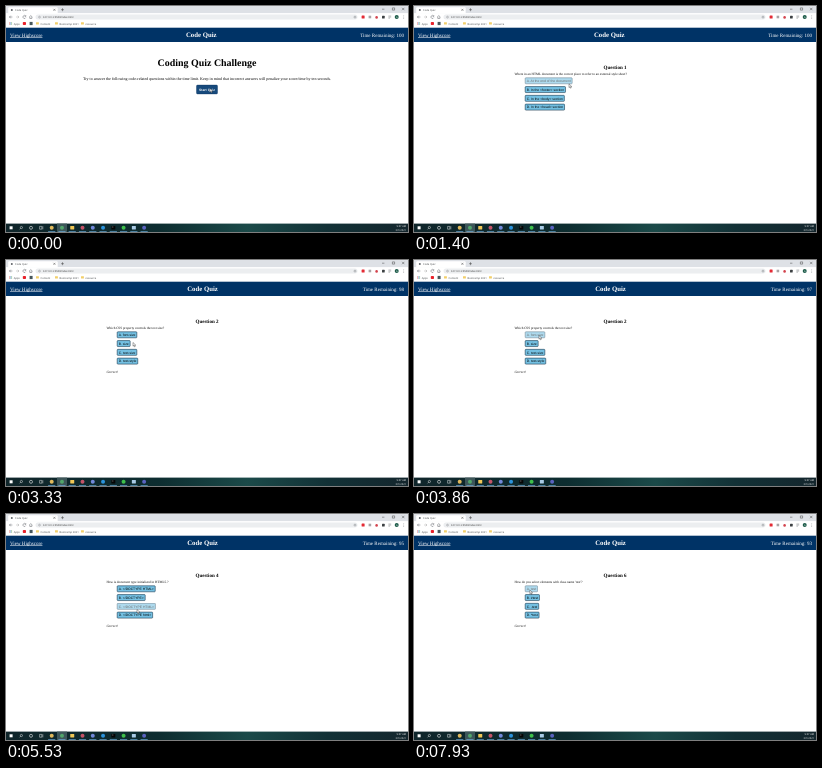
An HTML page that plays this animation: 402 px wide and 226 px high, repeating every 8000 ms.

```html
<!DOCTYPE html>
<html lang="en">
<head>
<meta charset="utf-8">
<title>Code Quiz</title>
<style>
  html, body { margin: 0; width: 100%; height: 100%; overflow: hidden; background: #fff; }
  svg { display: block; width: 402px; height: 226px; }
  text { text-rendering: geometricPrecision; white-space: pre; }
  .serif { font-family: "Liberation Serif", "Times New Roman", serif; }
  .sans { font-family: "Liberation Sans", Arial, sans-serif; }
  .ui { font-family: "Open Sans", "Noto Sans", sans-serif; }
  .bold { font-weight: bold; }
  .mid { text-anchor: middle; }
  .end { text-anchor: end; }
  .hover { opacity: .58; }
</style>
</head>
<body>
<svg id="stage" viewBox="0 0 402 226" xmlns="http://www.w3.org/2000/svg">
  <defs>
    <linearGradient id="bar">
      <stop offset="0" stop-color="#10262b"/>
      <stop offset=".38" stop-color="#0d2d30"/>
      <stop offset=".6" stop-color="#1b4a49"/>
      <stop offset=".8" stop-color="#123136"/>
      <stop offset="1" stop-color="#14262d"/>
    </linearGradient>
  </defs>
</svg>
<script>
const LOOP = 8000, FPS = 15, START = 530;
const stage = document.getElementById("stage");

function add(parent, tag, attrs) {
  const el = document.createElementNS("http://www.w3.org/2000/svg", tag);
  for (const key in attrs) el.setAttribute(key, attrs[key]);
  parent.appendChild(el);
  return el;
}
const rect = (p, x, y, width, height, fill, more) =>
  add(p, "rect", { x, y, width, height, fill, ...more });
const dot = (p, cx, cy, r, fill, more) => add(p, "circle", { cx, cy, r, fill, ...more });
const line = (p, d, stroke, w = .5) =>
  add(p, "path", { d, stroke, "stroke-width": w, fill: "none" });
function text(p, str, x, y, size, cls, fill = "#000", more) {
  const el = add(p, "text", { x, y, "font-size": size, class: cls, fill, ...more });
  el.textContent = str;
  return el;
}

// Browser window
const chrome = add(stage, "g", {});
const gray = "#5f6368";
rect(chrome, 0, 0, 402, 7.4, "#dee1e6");
rect(chrome, 2.2, 1.2, 49.5, 6.4, "#fff", { rx: 1.2 });
dot(chrome, 5.8, 4.1, 1, gray);
text(chrome, "Code Quiz", 9, 4.6, 2.6, "ui", "#3c4043");
line(chrome, "M47.4 2.8l2 2m0-2l-2 2M56.5 2.2v3M55 3.7h3", "#333", .45);
line(chrome, "M376 3.2h2.4M386.4 1.9h2.2v2.2h-2.2zM396 1.8l2.4 2.4m0-2.4l-2.4 2.4", "#222", .4);
rect(chrome, 0, 7.2, 402, 14.8, "#fff");
line(chrome, "M6.4 11H3.4m1.3-1.3L3.4 11l1.3 1.3", gray);
line(chrome, "M10 11h3m-1.3-1.3L13 11l-1.3 1.3", "#aaa");
line(chrome, "M19.6 10a1.5 1.5 0 1 0 .2 1.6M19.8 9.2v1.2h-1.2", gray);
line(chrome, "M23.2 11.1l1.6-1.5 1.6 1.5M23.8 10.8v1.7h2v-1.7", gray);
rect(chrome, 29.5, 8.6, 322, 5, "#eceef0", { rx: 2.5 });
dot(chrome, 33.5, 11.1, .9, "none", { stroke: gray, "stroke-width": .35 });
text(chrome, "127.0.0.1:5500/index.html", 37, 12, 2.65, "sans", "#444");
dot(chrome, 349, 11.1, 1, "none", { stroke: gray, "stroke-width": .4 });
rect(chrome, 355.6, 9.5, 3, 3, "#e32b35", { rx: .5 });
rect(chrome, 362.6, 9.7, 2.6, 2.6, "#a9a3a5");
dot(chrome, 370.6, 11.4, 1.3, "#d3434d");
rect(chrome, 376, 9.7, 2.7, 2.7, "#3c4043", { rx: .5 });
line(chrome, "M382.4 10h2.8m-2.8 1.1h2.8m-2.8 1.1h1.6", gray, .4);
dot(chrome, 390.7, 11.1, 2, "#1c5b49");
text(chrome, "A", 390.7, 12, 2.4, "sans mid", "#fff");
for (const y of [9.8, 11.1, 12.4]) dot(chrome, 397.8, y, .35, gray);

for (let i = 0; i < 9; i++)
  rect(chrome, 3.4 + i % 3, 16.2 + Math.floor(i / 3), .65, .65, ["#d9524a", "#4b86d8", "#48a05a"][i % 3]);
text(chrome, "Apps", 7.8, 18.5, 2.6, "ui", "#3c4043");
rect(chrome, 16.8, 15.9, 3.2, 3.2, "#e8222b", { rx: .8 });
rect(chrome, 23.6, 15.9, 3, 3.2, "#46565b");
[[30, "Content"], [49, "Bootcamp 2021"], [75, "resource"]].forEach(([x, name]) => {
  rect(chrome, x, 16.3, 2.9, 2.3, "#f2cf6a", { rx: .3 });
  text(chrome, name, x + 4.6, 18.5, 2.6, "ui", "#3c4043");
});

// Page header
rect(stage, 0, 21.7, 402, 14.3, "#003366");
const scores = text(stage, "View Highscore", 4, 30.5, 5.03, "serif", "#fff", { "text-decoration": "underline" });
const heading = text(stage, "Code Quiz", 195.5, 31, 6.75, "serif bold mid", "#fff");
const clock = text(stage, "Time Remaining: 100", 398, 30.5, 5.03, "serif end", "#fff");

// Quiz screens
const quiz = [
  ["Where in an HTML document is the correct place to refer to an external style sheet?",
    "At the end of the document", "In the <footer> section", "In the <body> section", "In the <head> section"],
  ["Which CSS property controls the text size?",
    "font-size", "size", "text-size", "text-style"],
  ["What does HTML stands for?",
    "Hypertext Machine language", "Hypertext and links markup language",
    "Hypertext Markup Language", "Hypertext Manual language"],
  ["How is document type initialized in HTML5.?",
    "</DOCTYPE HTML>", "</DOCTYPE>", "<!DOCTYPE HTML>", "</DOCTYPE html>"],
  ["Which HTML attribute is used to define inline styles?",
    "class", "style", "styles", "font"],
  ["How do you select elements with class name 'test'?",
    "test", "#test", ".test", "*test"]
];

function introScreen() {
  const g = add(stage, "g", {});
  text(g, "Coding Quiz Challenge", 201, 59.6, 9.95, "serif bold mid");
  text(g, "Try to answer the following code-related questions within the time limit. " +
    "Keep in mind that incorrect answers will penalize your score/time by ten seconds.",
    201, 73.8, 4.01, "serif mid");
  rect(g, 190.5, 79.1, 21, 8.8, "#174a7c", { rx: 1, stroke: "#0c3460", "stroke-width": .4 });
  text(g, "Start Quiz", 201, 84.7, 3.35, "sans bold mid", "#fff");
  return { g, buttons: [] };
}

function questionScreen([question, ...options], n) {
  const g = add(stage, "g", {});
  text(g, "Question " + (n + 1), 201, 62.5, 5.03, "serif bold mid");
  text(g, question, 100.4, 69, 3.35, "serif");
  const buttons = options.map((option, i) => {
    const y = 71.8 + i * 8.77, b = add(g, "g", {});
    const box = rect(b, 111.2, y, 10, 6, "#74c0e2", { rx: .7, stroke: "#0b2c44", "stroke-width": .55 });
    const label = text(b, "ABCD"[i] + ". " + option, 112.7, y + 4.2, 3.35, "sans");
    const width = label.getComputedTextLength() + 2.9;
    box.setAttribute("width", width);
    return { b, x: 111, y: y - .3, right: 111.4 + width, bottom: y + 6.3 };
  });
  if (n) text(g, "Correct!", 100.4, 113.3, 3.35, "serif", "#000", { "font-style": "italic" });
  return { g, buttons };
}

const screens = [introScreen(), ...quiz.map(questionScreen)];
const changes = [START, 2530, 4060, 4930, 6400, 7200];

// Taskbar
const bar = add(stage, "g", {});
rect(bar, 0, 217.6, 402, 8.4, "url(#bar)");
rect(bar, 51, 217.6, 10, 8.4, "#3d5659");
rect(bar, 3.6, 220.3, 3, 3, "#fff");
dot(bar, 15.4, 221.5, 1.1, "none", { stroke: "#fff", "stroke-width": .45 });
line(bar, "M14.6 222.3l-1 1", "#fff");
dot(bar, 25, 221.8, 1.5, "none", { stroke: "#fff", "stroke-width": .55 });
line(bar, "M33.6 220.4h2.2v2.8h-2.2zM36.8 220.2v3.2", "#fff", .45);
const apps = ["#e0b95c", "#52a66b", "#f0c756", "#c45368", "#7289da", "#2b93dc", "#050505", "#3ec04b", "#a9cbe6", "#5a63c0"];
apps.forEach((color, i) => {
  const x = 45.7 + i * 10.27;
  if ([2, 6, 8].includes(i)) rect(bar, x - 2, 220, 4, 3.4, color, { rx: .3 });
  else dot(bar, x, 221.7, 2, color);
  if (i === 6) line(bar, `M${x - 1.4} 221h1.5`, "#ddd", .4);
  rect(bar, x - 3.6, 225.4, 7.2, .6, "#76b9ed");
});
text(bar, "9:07 AM", 400, 220.9, 2.5, "ui end", "#fff");
text(bar, "3/1/2021", 400, 224.6, 2.5, "ui end", "#fff");

const pointer = add(stage, "path", {
  d: "M0 0v3.7l.9-.8.6 1.4.7-.3-.6-1.3h1.2z",
  fill: "#fff", stroke: "#111", "stroke-width": .35
});

// Pointer path: time, x, y
const path = [
  [0, 204, 82.5], [530, 203, 83.8], [730, 203, 83.8], [1000, 184, 82],
  [1200, 184, 82], [1400, 155, 77.9], [1700, 146, 88], [2060, 141, 100.5],
  [2530, 141, 100.5], [2900, 135, 94], [3330, 127, 82.5], [3860, 125, 75.5],
  [4060, 125, 75.5], [4530, 126.5, 95.8], [4860, 128, 94.5], [4930, 128, 94.5],
  [5530, 131, 95.5], [6400, 131, 95.5], [6730, 122, 84.5], [7730, 122, 84.5],
  [7930, 115.8, 76], [8000, 115.8, 76]
];

function pointerAt(t) {
  const i = Math.max(1, path.findIndex(p => p[0] >= t));
  const [t0, x0, y0] = path[i - 1], [t1, x1, y1] = path[i];
  const k = (t - t0) / (t1 - t0), e = k * k * (3 - 2 * k);
  return [x0 + (x1 - x0) * e, y0 + (y1 - y0) * e];
}

let shownTime = 0;
function setTime(left) {
  if (left === shownTime) return;
  shownTime = left;
  clock.textContent = "Time Remaining: " + left;
  const leftEdge = 4 + scores.getComputedTextLength();
  const rightEdge = 398 - clock.getComputedTextLength();
  heading.setAttribute("x", (leftEdge + rightEdge) / 2);
}

function draw(now) {
  const t = Math.min(LOOP, Math.floor((now % LOOP + 7) * FPS / 1000) * 1000 / FPS);
  const current = changes.filter(c => t >= c).length;
  const [x, y] = pointerAt(t);
  screens.forEach(({ g, buttons }, i) => {
    g.style.display = i === current ? "" : "none";
    for (const r of buttons)
      r.b.classList.toggle("hover", x > r.x && x < r.right && y > r.y && y < r.bottom);
  });
  setTime(100 - Math.max(0, Math.floor((t - START) / 1000)));
  pointer.setAttribute("transform", `translate(${x} ${y})`);
}

const begin = performance.now();
function tick() {
  draw(performance.now() - begin);
  requestAnimationFrame(tick);
}
tick();
</script>
</body>
</html>
```
